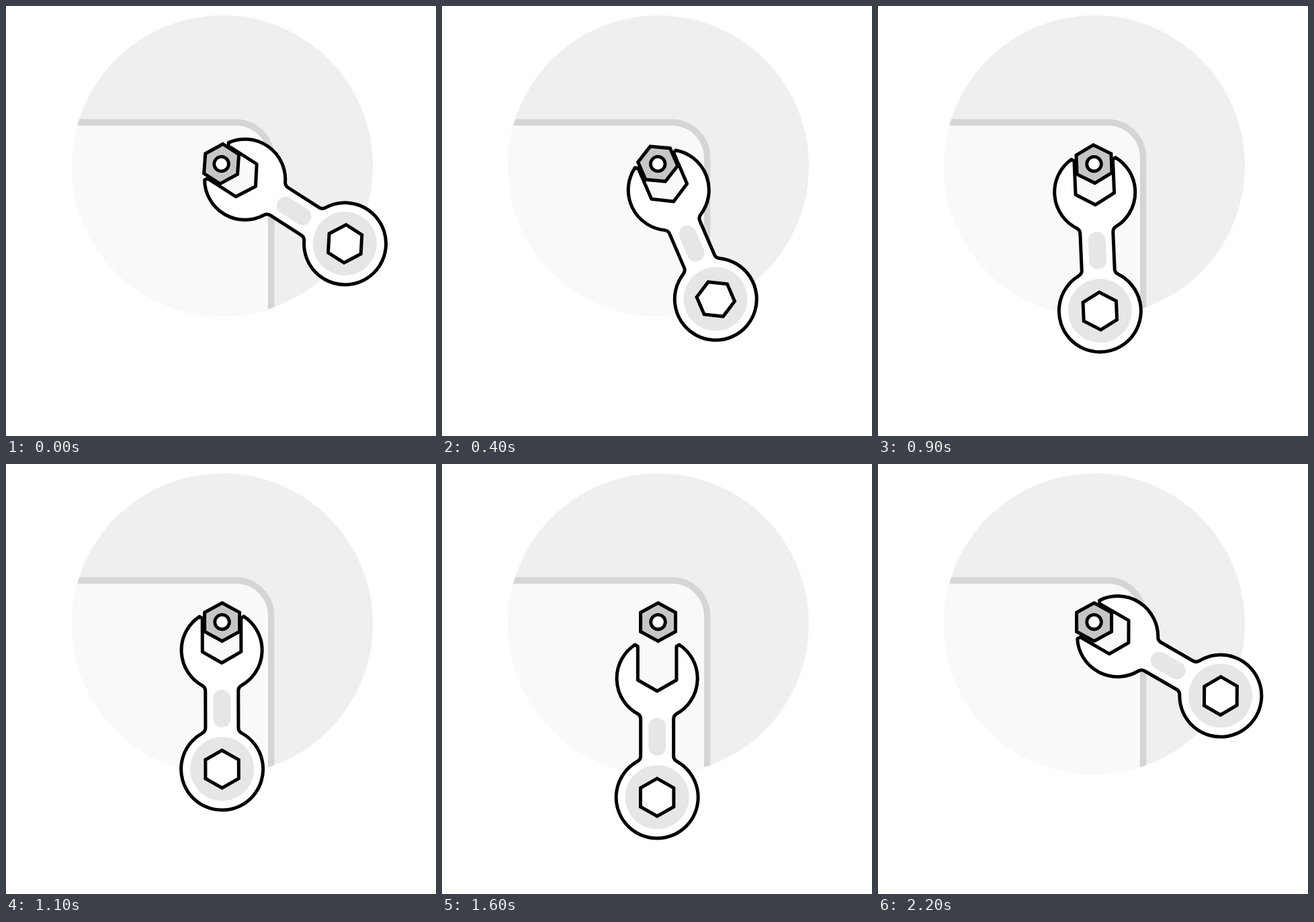
An HTML page that plays this animation: 640x640 px, repeating every 2500 ms.

```html
<!DOCTYPE html>
<html lang="en">
<head>
<meta charset="utf-8">
<title>Wrench turning a nut</title>
<style>
  html, body { margin: 0; width: 100%; height: 100%; overflow: hidden; background: #fff; }
  svg { display: block; width: 100vw; height: 100vh; }
  .line { fill: #fff; stroke: #000; stroke-width: 5; }
  .shade { fill: #e6e6e6; }
</style>
</head>
<body>
<svg viewBox="0 0 640 640">
  <clipPath id="disc"><circle cx="322" cy="238" r="224"/></clipPath>
  <g clip-path="url(#disc)">
    <rect width="640" height="640" fill="#efefef"/>
    <path d="M0 173.2H342A52.7 52.7 0 0 1 394.7 225.9V640H0Z"
          fill="#f9f9f9" stroke="#d5d5d5" stroke-width="9.5"/>
  </g>

  <!-- Both parts are drawn around the turning point -->
  <g id="wrench">
    <path class="line" stroke-linejoin="round"
          d="M-33-9L-28.8-6.5V43.5L0 60L28.8 43.5V-6.5L33-9A60.1 60.1 0 0 1 29 93.8
             C26 95.5 24.5 98 24.5 102V157Q24.5 162 30 165A61 61 0 1 1-30 165
             Q-24.5 162-24.5 157V102C-24.5 98-26 95.5-29 93.8A60.1 60.1 0 0 1-33-9Z"/>
    <rect class="shade" x="-13" y="100" width="26" height="56" rx="13"/>
    <circle class="shade" cy="217.8" r="47.5"/>
    <path class="line" d="M0 190.2L24.7 204.2V232.2L0 246.2L-24.7 232.2V204.2Z"/>
  </g>
  <g id="nut">
    <g transform="translate(.6 -.8)">
      <path class="line" style="fill:#c6c6c6" d="M0-28.4L26-14.2V14.2L0 28.4L-26 14.2V-14.2Z"/>
      <circle class="line" r="10.8" style="stroke-width:4.8"/>
    </g>
  </g>
</svg>
<script>
  const LOOP = 2500, STEP = 100;
  const PIVOT = { x: 321, y: 236 };
  // Square root of the wrench angle while it turns the nut: [ms, value]
  const TURN = [[0, 7.57], [200, 6.22], [700, 2.74], [1100, 0.4], [1200, 0]];
  const wrench = document.getElementById("wrench");
  const nut = document.getElementById("nut");

  const clamp = v => Math.min(1, Math.max(0, v));
  const mix = (a, b, k) => a + (b - a) * k;

  function turnAngle(t) {
    const i = TURN.findIndex(([ms]) => ms > t);
    if (i < 0) return 0;
    const [t0, v0] = TURN[i - 1], [t1, v1] = TURN[i];
    return mix(v0, v1, (t - t0) / (t1 - t0)) ** 2;
  }

  function place(el, x, y, angle) {
    el.setAttribute("transform", `translate(${x} ${y}) rotate(${-angle})`);
  }

  function draw(t) {
    const turn = turnAngle(t);
    const slide = clamp((t - 1100) / 500);
    const back = clamp((t - 1700) / 500) ** 1.85;
    const x = PIVOT.x - 0.8 * slide * (1 - back) + 15.5 * Math.sin(Math.PI * back);
    const y = PIVOT.y + 42 * slide * (1 - back ** 1.9);
    place(wrench, x, y, turn + 60 * back);
    place(nut, PIVOT.x, PIVOT.y, turn);
  }

  function tick() {
    const step = Math.floor(performance.now() / STEP + 0.02);
    draw((step * STEP) % LOOP);
    requestAnimationFrame(tick);
  }
  tick();
</script>
</body>
</html>
```
